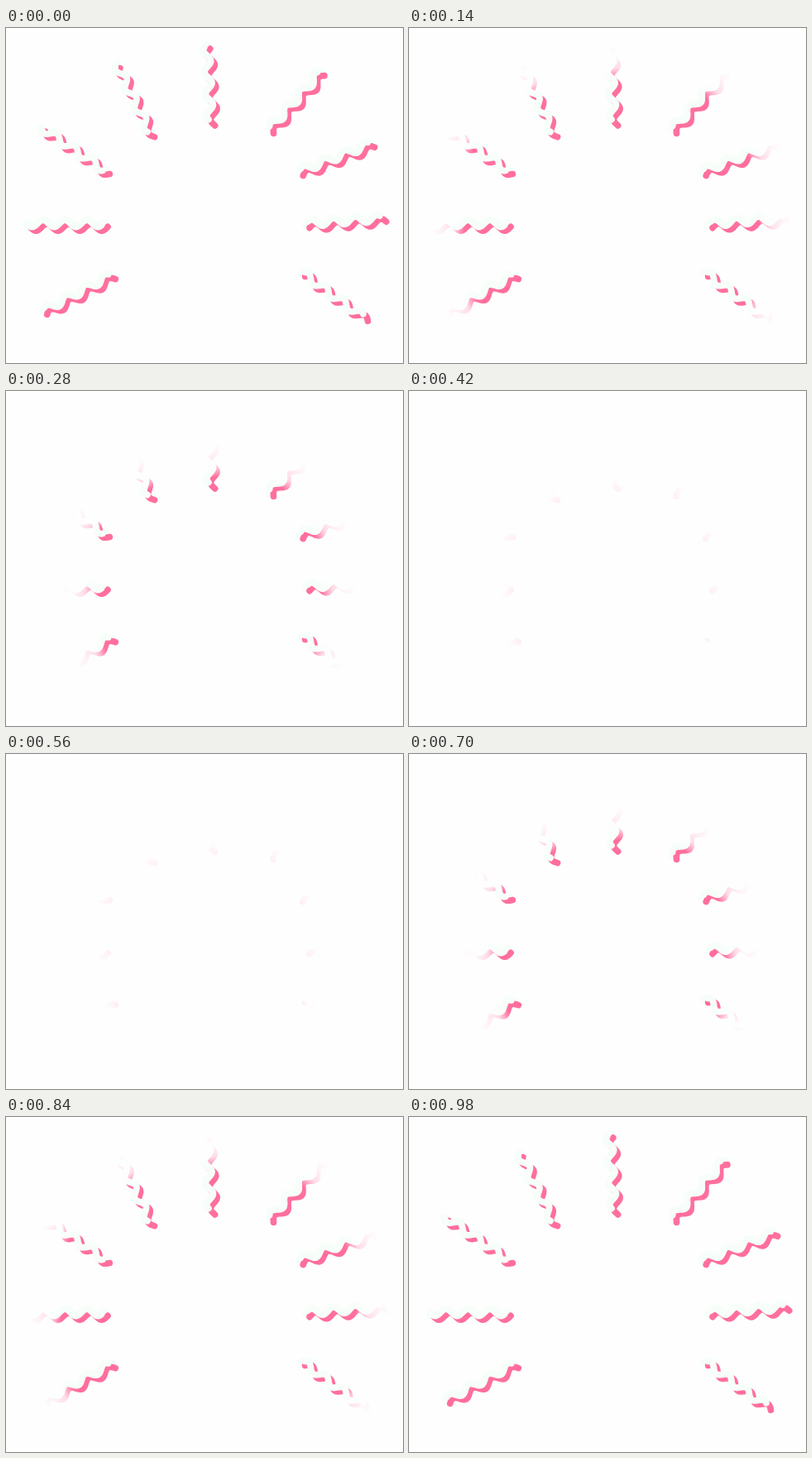
Recreate the animation shown at these times as an HTML page with a canvas. Size 480 by 405 pixels, loop 1.05 s.

```html
<!DOCTYPE html>
<html lang="en">
<head>
<meta charset="utf-8">
<title>Squiggle burst</title>
<style>
  html, body { margin: 0; width: 100%; height: 100%; overflow: hidden; background: #fefefe; }
  canvas { display: block; }
</style>
</head>
<body>
<canvas id="stage" width="480" height="405"></canvas>
<script>
const ctx = document.getElementById('stage').getContext('2d');
const STEP = 70, STEPS = 15, LEN = 93, PERIOD = 26.5, AMP = 4.2;
const PINK = '#ff6f9d', MINT = '#f7fefa', PAPER = '254,254,254';

// inner end x, y, heading in degrees clockwise from right, side of the first bend
const rays = [
  [252, 118, -93, 1], [323, 127, -48, 1], [359, 178, -21, 1],
  [367, 241, -4, 1], [362, 300, 36, 1], [132, 303, 152, -1],
  [123, 241, 180, 1], [125, 177, 214, 1], [179, 132, 244, 1]
];

function place([x, y, heading, side], shift = 0) {
  ctx.translate(x + shift, y + shift);
  ctx.rotate(heading * Math.PI / 180);
  ctx.scale(1, side);
}

function squiggle(ray, color, width, shift = 0, trim = 0) {
  ctx.save();
  place(ray, shift);
  ctx.beginPath();
  for (let s = trim; s <= LEN - trim; s++) {
    ctx.lineTo(s, AMP * Math.cos((s - 20.5) / PERIOD * 2 * Math.PI));
  }
  ctx.strokeStyle = color;
  ctx.lineWidth = width;
  ctx.stroke();
  ctx.restore();
}

// Hide the outer part of a ray behind a soft edge
function fade(ray, level) {
  const start = (1.05 - 0.225 * level) * LEN;
  ctx.save();
  place(ray);
  const veil = ctx.createLinearGradient(start, 0, start + 0.45 * LEN, 0);
  [0, 0.77, 0.92, 1].forEach((alpha, i) =>
    veil.addColorStop(i / 3, `rgba(${PAPER},${alpha})`));
  ctx.fillStyle = veil;
  ctx.fillRect(-18, -20, LEN + 36, 40);
  ctx.restore();
}

function draw(now) {
  const step = Math.floor(now / STEP) % STEPS;
  const level = Math.min(step, STEPS - 1 - step);
  ctx.fillStyle = `rgb(${PAPER})`;
  ctx.fillRect(0, 0, 480, 405);
  ctx.lineCap = ctx.lineJoin = 'round';
  for (const ray of rays) {
    squiggle(ray, MINT, 11, -4);
    squiggle(ray, PINK, 7.6);
    squiggle(ray, MINT, 7.8, -4.7, 3);
    if (level) fade(ray, level);
  }
}

const begin = performance.now();
function tick() {
  draw(performance.now() - begin);
  requestAnimationFrame(tick);
}
tick();
</script>
</body>
</html>
```
